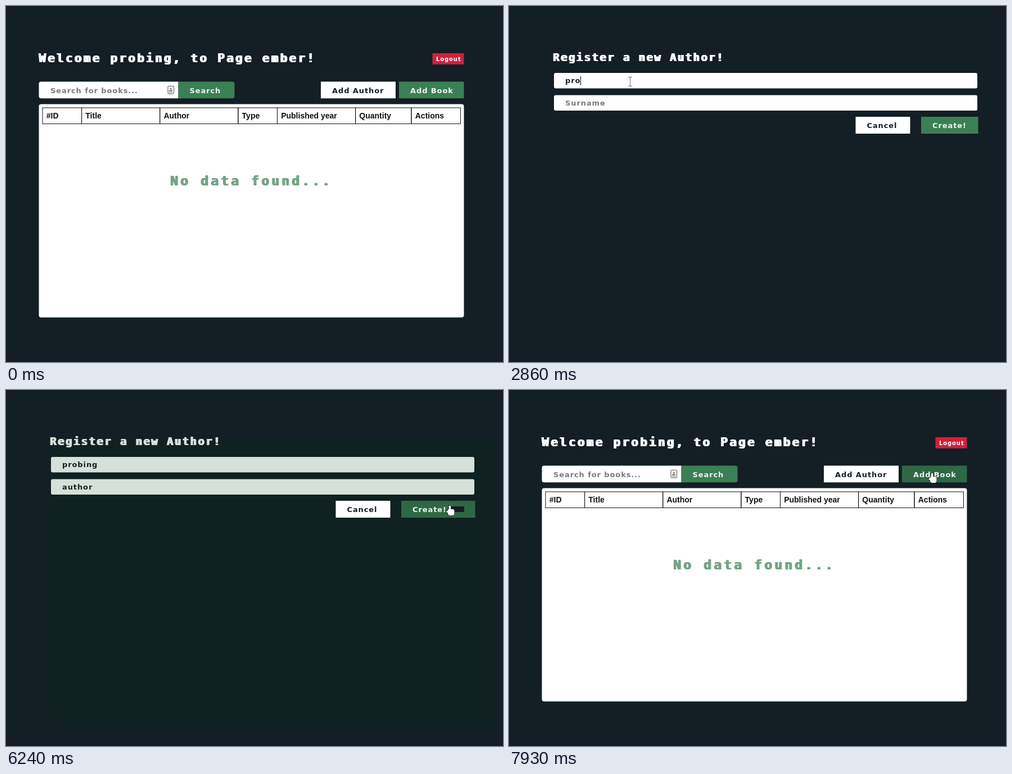
Recreate the animation shown at these times as an HTML page with a canvas. Size 884 px wide and 633 px high, loop 8 s.

```html
<!DOCTYPE html>
<html lang="en">
<head>
<meta charset="utf-8">
<title>Book library</title>
<style>
  html, body { margin: 0; width: 100%; height: 100%; overflow: hidden; background: #131e25; }
  canvas { display: block; }
</style>
</head>
<body>
<canvas id="stage" width="884" height="633"></canvas>
<script>
const ctx = document.getElementById('stage').getContext('2d');
const LOOP = 8000, TICK = 130;
const FORM_OPEN = 1040, LOADING = 6110, FORM_CLOSE = 6500;
const DARK = '#131e25', INK = '#111', PALE = '#eef6f0', GRAY = '#7a7a7a';
const GREEN = '#3b8054', GREEN_HOVER = '#2f6846';
const SANS = '"DejaVu Sans", sans-serif';

const rect = (x, y, w, h) => ({ x, y, w, h });
const PANEL = rect(58.5, 174.5, 756, 379.3);
const SEARCH_FIELD = rect(58.5, 134.5, 248, 29.8);
const SEARCH = rect(306.5, 134.5, 100, 29.8);
const ADD_AUTHOR = rect(560, 134.5, 133, 29.8);
const ADD_BOOK = rect(699, 134.5, 115.5, 29.8);
const NAME_FIELD = rect(80, 119, 753, 27.5);
const SURNAME_FIELD = rect(80, 158.5, 753, 27.5);

// Column widths as shares of the table
const TABLE = rect(65, 181, 743.5, 28.5);
const COLUMNS = {
  '#ID': 7, 'Title': 14, 'Author': 14, 'Type': 7,
  'Published year': 14, 'Quantity': 10, 'Actions': 8.8
};

// The pointer enters from below and glides from place to place
const ENTRY = { x: 640, y: 603 };
const GLIDES = [
  { leave: 130, arrive: 910, x: 611, y: 153 },
  { leave: 1040, arrive: 1690, x: 215, y: 134 },
  { leave: 4810, arrive: 4940, x: 252, y: 121 },
  { leave: 4940, arrive: 5850, x: 789, y: 205 },
  { leave: 6370, arrive: 7020, x: 743, y: 225 },
  { leave: 7150, arrive: 7800, x: 752, y: 147 }
];

const clamp = v => Math.min(1, Math.max(0, v));
const ease = k => k * k * (3 - 2 * k);
const inside = (p, r) => p.x >= r.x && p.x < r.x + r.w && p.y >= r.y && p.y < r.y + r.h;

function pointerAt(t) {
  return GLIDES.reduce((p, g) => {
    const k = ease(clamp((t - g.leave) / (g.arrive - g.leave)));
    return { x: p.x + (g.x - p.x) * k, y: p.y + (g.y - p.y) * k };
  }, ENTRY);
}

// Letters arrive at a steady rate, the first at `from`, the last at `to`
function typed(word, from, to, t) {
  if (t < from) return '';
  return word.slice(0, 1 + Math.floor(clamp((t - from) / (to - from)) * (word.length - 1)));
}

function box(r, color, radius = 0) {
  ctx.fillStyle = color;
  ctx.beginPath();
  ctx.roundRect(r.x, r.y, r.w, r.h, radius);
  ctx.fill();
}

function text(str, x, y, color, font = `bold 13px ${SANS}`, spacing = 0.9) {
  ctx.font = font;
  ctx.letterSpacing = spacing + 'px';
  ctx.fillStyle = color;
  ctx.fillText(str, x, y);
  return ctx.measureText(str).width;
}

// Evenly pitched type, struck three times for heavy uprights
function heading(str, x, y, color, size, pitch) {
  const font = `bold ${size}px "DejaVu Sans Mono", monospace`;
  for (const dx of [-0.5, 0.4, 1.3]) text(str, x + dx, y, color, font, pitch - size * 0.602);
}

function button(r, label, fill, color, radius) {
  box(r, fill, radius);
  text(label, r.x + 20, r.y + 20, color);
}

const greenButton = (r, label, pointer, radius) =>
  button(r, label, inside(pointer, r) ? GREEN_HOVER : GREEN, PALE, radius);

function contactIcon(x, y) {
  ctx.strokeStyle = '#858585';
  ctx.lineWidth = 1.5;
  ctx.beginPath();
  ctx.roundRect(x - 5, y - 7, 10.5, 13.5, 2);
  ctx.stroke();
  box(rect(x - 1.5, y - 4, 3.4, 3.4), '#858585', 1.7);
  box(rect(x - 3, y, 6, 2.5), '#858585');
  box(rect(x - 3, y + 3.5, 6, 1), '#858585');
}

function drawTable() {
  ctx.strokeStyle = INK;
  ctx.lineWidth = 1;
  const unit = TABLE.w / Object.values(COLUMNS).reduce((a, b) => a + b);
  let x = TABLE.x;
  for (const [label, share] of Object.entries(COLUMNS)) {
    ctx.strokeRect(x, TABLE.y, share * unit, TABLE.h);
    text(label, x + 6.7, TABLE.y + 19, INK, 'bold 14px "Liberation Sans", Arial, sans-serif', 0);
    x += share * unit;
  }
}

function drawList(pointer) {
  heading('Welcome probing, to Page ember!', 58, 100, '#fff', 21, 15.9);
  box(rect(758.5, 84, 56, 19.7), '#d0213d');
  text('Logout', 765, 98, '#fff', `bold 10px ${SANS}`);

  box(SEARCH_FIELD, '#fff', [4, 0, 0, 4]);
  text('Search for books...', 79, 154.5, GRAY);
  contactIcon(293, 149.5);
  greenButton(SEARCH, 'Search', pointer, [0, 4, 4, 0]);
  button(ADD_AUTHOR, 'Add Author', '#fff', DARK);
  greenButton(ADD_BOOK, 'Add Book', pointer);

  box(PANEL, '#fff', 4);
  drawTable();
  heading('No data found...', 292, 319, '#75a385', 23, 18);
}

function drawField(r, label, value, focused) {
  const x = r.x + 20, y = r.y + 18.3;
  box(r, '#fff', 3);
  const width = text(value || label, x, y, value ? DARK : GRAY);
  if (focused) box(rect(Math.round(x + (value && width)), r.y + 6, 1, 16), INK);
}

function drawForm(t, pointer) {
  const loading = t >= LOADING;
  heading('Register a new Author!', 78, 98, '#fff', 19, 13.85);
  drawField(NAME_FIELD, 'Name', typed('probing', 2600, 3250, t), t >= 2340 && t < 3640);
  drawField(SURNAME_FIELD, 'Surname', typed('author', 3900, 4420, t), t >= 3640 && !loading);
  if (loading) box(rect(79, 83, 794, 510), 'rgba(0, 50, 13, 0.155)');

  // The spinner widens "Create!" and pushes "Cancel" aside
  const shift = loading ? 30 : 0;
  button(rect(616.5 - shift, 197, 97, 30), 'Cancel', '#fff', DARK);
  greenButton(rect(733 - shift, 197, 101.5 + shift, 30), 'Create!', pointer);
  if (loading) box(rect(790, 207, 25, 10), DARK);
}

function outlined(fill, edge, width) {
  ctx.lineJoin = 'round';
  ctx.lineWidth = width;
  ctx.strokeStyle = edge;
  ctx.stroke();
  ctx.fillStyle = fill;
  ctx.fill();
}

const CURSORS = {
  arrow() {
    const points = [[0, 0], [0, 15], [3.4, 11.8], [5.8, 17], [8, 16], [5.8, 11], [10.3, 11]];
    points.forEach(([x, y]) => ctx.lineTo(x, y));
    ctx.closePath();
    outlined(INK, '#fff', 1.5);
  },
  hand() {
    ctx.roundRect(-1.7, 0, 3.4, 12, 1.7);
    ctx.roundRect(-3.5, 6.5, 11.5, 11, [2, 3, 4, 4]);
    ctx.roundRect(-6, 9, 6, 3.5, 1.7);
    outlined('#fff', '#222', 1.6);
  },
  beam() {
    for (const y of [-8, 8]) {
      ctx.moveTo(-3.5, y);
      ctx.lineTo(3.5, y);
    }
    ctx.moveTo(0, -8);
    ctx.lineTo(0, 8);
    outlined('#fff', 'rgba(255, 255, 255, 0.7)', 2.6);
    outlined('#fff', '#777', 1);
  }
};

function cursorFor(pointer, onForm) {
  const over = rects => rects.some(r => inside(pointer, r));
  if (onForm && over([NAME_FIELD, SURNAME_FIELD])) return 'beam';
  return over(onForm ? [rect(617, 197, 217, 30)] : [ADD_AUTHOR, ADD_BOOK]) ? 'hand' : 'arrow';
}

function draw(now) {
  const t = Math.floor((now % LOOP) / TICK) * TICK;
  const onForm = t >= FORM_OPEN && t < FORM_CLOSE;
  const pointer = pointerAt(t);
  box(rect(0, 0, 884, 633), DARK);
  if (onForm) drawForm(t, pointer);
  else drawList(pointer);
  if (t < GLIDES[0].leave) return;

  // The cursor keeps its shape until it moves on the new page
  const cursor = cursorFor(pointer, onForm && t > FORM_OPEN);
  ctx.save();
  ctx.translate(Math.round(pointer.x) + 0.5, Math.round(pointer.y) + 0.5);
  ctx.beginPath();
  CURSORS[cursor]();
  ctx.restore();
}

let start;
function frame(now) {
  start ??= now;
  draw(now - start);
  requestAnimationFrame(frame);
}
draw(0);
requestAnimationFrame(frame);
</script>
</body>
</html>
```
